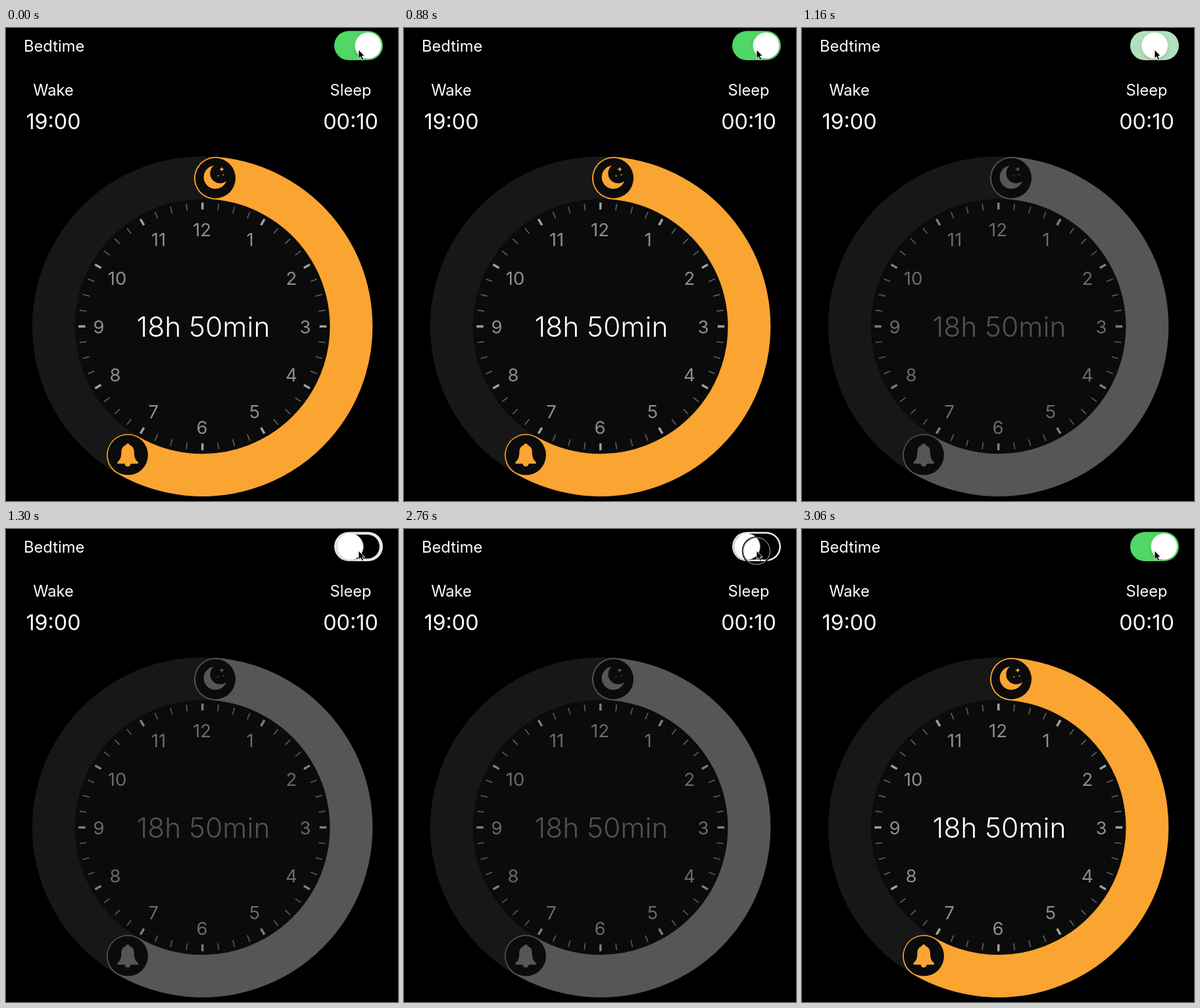
An HTML page for the animation above (3.08 s loop, 596 px wide and 720 px high).

```html
<!DOCTYPE html>
<html lang="en">
<head>
<meta charset="utf-8">
<title>Bedtime</title>
<style>
  html, body { margin: 0; width: 100%; height: 100%; overflow: hidden; background: #000; }
  svg { display: block; width: 596px; height: 720px; font-family: Inter, Roboto, sans-serif; }
  text { fill: currentColor; }
  .middle { text-anchor: middle; }
  .label { color: #fff; font-size: 23.7px; }
  .time { color: #fff; font-size: 32.3px; font-weight: 400; }

  /* Dial parts swap colour at once when the switch is pressed. */
  .tint { color: var(--on); animation: tint 3080ms step-end infinite; }
  .accent { --on: #faa432; --off: #565656; }
  .total { --on: #fff; --off: #505050; font-size: 42.6px; font-weight: 300; }
  .numbers { --on: #8d8d8d; --off: #6a6a6a; font-size: 27.6px; font-weight: 400; }
  .hours { --on: #a0a0a0; --off: #7c7c7c; }
  .quarters { --on: #626262; --off: #5c5c5c; }
  @keyframes tint {
    0%, 90.75%, 100% { color: var(--on); }
    37.5% { color: var(--off); }
  }

  .track, .hollow, .knob { animation: 3080ms infinite; }
  .track { fill: #50d765; animation-name: track; }
  .hollow { transform-origin: 536px 26.8px; animation-name: hollow; }
  .knob { animation-name: knob; filter: drop-shadow(0 2px 2px #0003); }
  .press { opacity: 0; animation: press 3080ms step-end infinite; }
  @keyframes track {
    0%, 37.49%, 96.75%, 100% { fill: #50d765; }
    37.5% { fill: #aedfba; animation-timing-function: ease-out; }
    44.2%, 90.75% { fill: #efefef; animation-timing-function: ease-out; }
  }
  @keyframes hollow {
    0%, 37.49%, 96.75%, 100% { transform: scale(0); }
    37.5% { transform: scale(.38); animation-timing-function: ease-out; }
    44.2%, 90.75% { transform: scale(1); animation-timing-function: ease-out; }
  }
  @keyframes knob {
    0%, 37.49%, 96.75%, 100% { transform: translateX(550.5px); }
    37.5% { transform: translateX(537px); animation-timing-function: ease-out; }
    44.2%, 90.75% { transform: translateX(521.5px); animation-timing-function: ease-out; }
  }
  @keyframes press {
    0%, 90.75%, 100% { opacity: 0; }
    89.5% { opacity: 1; }
  }
</style>
</head>
<body>
<svg viewBox="0 0 596 720">
  <text class="label" x="27" y="36">Bedtime</text>
  <g class="label middle">
    <text x="72" y="103">Wake</text>
    <text x="524" y="103">Sleep</text>
  </g>
  <g class="time middle">
    <text x="72" y="154">19:00</text>
    <text x="524" y="154">00:10</text>
  </g>

  <rect class="track" x="499" y="4.5" width="74" height="44.5" rx="22.25"/>
  <rect class="hollow" x="501.5" y="7" width="69" height="39.5" rx="19.75"/>
  <circle class="knob" cy="26.8" r="20" fill="#fff"/>
  <g class="press" fill="none">
    <circle cx="536" cy="33.5" r="21" stroke="#000" stroke-width="2.5"/>
    <circle cx="536" cy="33.5" r="20.5" stroke="#bbb"/>
  </g>
  <path d="M536 33V46.5L539 43.7 541.3 48.6 543.7 47.5 541.5 42.8H545.4Z" stroke="#fff" stroke-width=".9"/>

  <circle cx="298.7" cy="454.2" r="258.8" fill="#171717"/>
  <circle cx="298.7" cy="454.2" r="194" fill="#0b0b0b"/>
  <g class="tint accent" fill="currentColor">
    <path d="M318.4 228.6A226.4 226.4 0 1 1 185.5 650.3" fill="none" stroke="currentColor" stroke-width="64.8" stroke-linecap="round"/>
    <circle cx="318.4" cy="228.6" r="30.6" fill="#0b0b0b"/>
    <circle cx="185.3" cy="650" r="30.6" fill="#0b0b0b"/>
    <path d="M316 209.5A17.7 17.7 0 1 0 335 233A15.1 15.1 0 0 1 316 209.5Z"/>
    <path d="M328 211Q328.4 214.6 332 215Q328.4 215.4 328 219Q327.6 215.4 324 215Q327.6 214.6 328 211Z"/>
    <circle cx="322.5" cy="225" r="1.1"/>
    <circle cx="330.5" cy="223.5" r="1.1"/>
    <path d="M182 635a3.2 3.2 0 0 1 6.200 0C192.500 636.500 194.600 640 194.800 645C195 654 196.500 657 200.500 660.500Q202 663.300 199.500 663.300H170.700Q168.200 663.300 169.700 660.500C173.700 657 175.200 654 175.400 645C175.600 640 177.700 636.500 182 635Z"/>
    <path d="M180.600 663H189.600A4.500 4.500 0 0 1 180.600 663Z"/>
  </g>
  <path class="tint quarters" id="quarters" stroke="currentColor" stroke-width="1.6"/>
  <path class="tint hours" id="hours" stroke="currentColor" stroke-width="3.5"/>
  <g class="tint numbers middle" id="numbers"></g>
  <text class="tint total middle" x="300" y="470">18h 50min</text>
</svg>
<script>
  const byId = id => document.getElementById(id);
  const center = { x: 298.7, y: 454.2 };

  const polar = (radius, turn) => {
    const angle = turn * 2 * Math.PI;
    return `${center.x + radius * Math.sin(angle)} ${center.y - radius * Math.cos(angle)}`;
  };
  const ticks = keep => Array.from({ length: 48 }, (_, i) => i)
    .filter(keep)
    .map(i => `M${polar(178, i / 48)}L${polar(188.5, i / 48)}`)
    .join('');

  byId('hours').setAttribute('d', ticks(i => i % 4 === 0));
  byId('quarters').setAttribute('d', ticks(i => i % 4));

  const places = [
    [371, 322], [434, 381], [455, 455], [434, 528], [378, 584], [298, 608],
    [224, 584], [166, 528], [141, 455], [169, 381], [232, 322], [298, 307]
  ];
  byId('numbers').innerHTML = places
    .map(([x, y], i) => `<text x="${x}" y="${y + 10}">${i + 1}</text>`)
    .join('');
</script>
</body>
</html>
```
